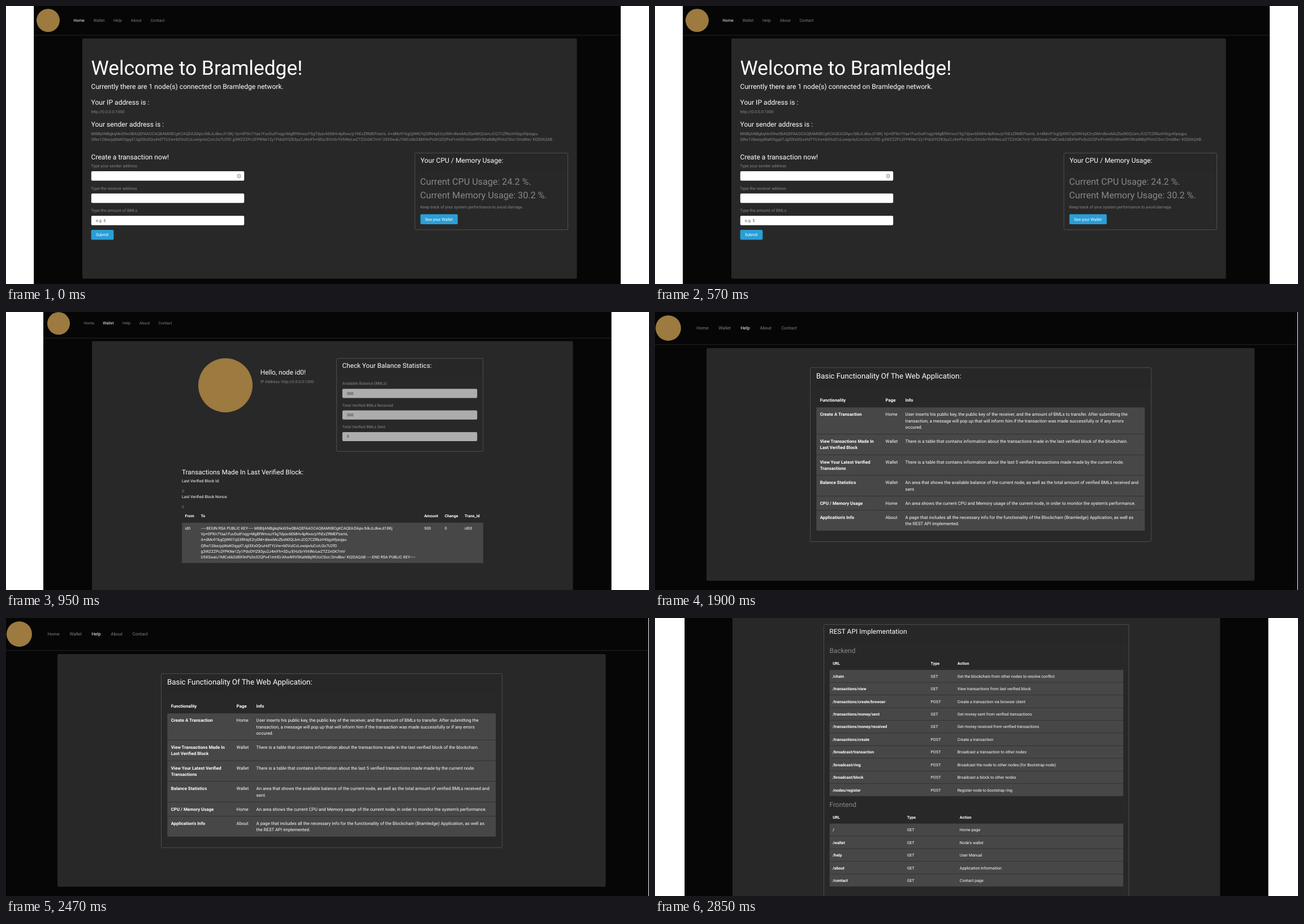
An HTML page for the animation above (3.8 s loop, 1137 by 493 pixels).

```html
<!DOCTYPE html>
<html lang="en">
<head>
<meta charset="utf-8">
<title>Bramledge web client</title>
<style>
  html, body { margin: 0; width: 100%; height: 100%; overflow: hidden; background: #fff; }
  svg { display: block; width: 1137px; height: 493px; }
  text { font-family: Roboto, sans-serif; text-rendering: geometricPrecision; white-space: pre; }
  .page { visibility: hidden; animation: show 3800ms step-end infinite; }
  @keyframes show {
    0% { visibility: visible; }
    25%, 100% { visibility: hidden; }
  }
</style>
</head>
<body>
<svg id="stage" viewBox="0 0 1137 493"></svg>
<script>
const stage = document.getElementById('stage');
const WHITE = '#fff', GREY = '#888', PANEL = '#282828', ROW = '#474747', BLUE = '#2a9fd6', GOLD = '#9c7a40';
const PAGES = ['Home', 'Wallet', 'Help', 'About', 'Contact'];
const KEY = [
  'MIIBIjANBgkqhkiG9w0BAQEFAAOCAQ8AMIIBCgKCAQEA2lApv/blkJLdkwJI18Kj',
  'Vp+0PXn7Yaa1FuvDutFnqg+MgBfWmouY5gTdyav6EMHv4pRxw/pYhExZRMEPzemL',
  'A+dMo91kgQjWKl7q53RHqX2ry0M+dlewMoZbxN0QLbmJCQ7CZRkzrH0qyAfpsqpu',
  'QRw12ikecjqWaKOqypl7Jgl3Xx0QruHdTYLVw+b0VuICcLowipvIuCcrLGs7U2fD',
  'g3WZZZPc2FPKNe1Zy1PdoDYIZ83yu2J4mFh+SDu/EHzSvYlrhlNvLwZTZ2nGK7mV',
  'U5XSwaIJ1MCx6b2d8X9nPs5n32QPx41mHD/AhwN9V5KatMbj9fUrzC0or/2md8w/ KQIDAQAB'
];

let page, body, head;

function add(tag, attrs, parent = page) {
  const el = document.createElementNS('http://www.w3.org/2000/svg', tag);
  for (const name in attrs) el.setAttribute(name, attrs[name]);
  return parent.appendChild(el);
}

function startPage(index, left, right, bodySize, headSize) {
  page = add('g', { class: 'page', style: `animation-delay:${950 * index - 3800}ms` }, stage);
  body = bodySize;
  head = headSize;
  rect(left, 0, right, 493, '#060606');
}

function rect(x1, y1, x2, y2, fill, rx = 0) {
  return add('rect', { x: x1, y: y1, width: x2 - x1, height: y2 - y1, fill, rx });
}

// y is roughly the middle of the capital letters
function text(x, y, str, fill = WHITE, size = body, weight = 400) {
  add('text', { x, y: y + 0.33 * size, fill, 'font-size': size, 'font-weight': weight }).textContent = str;
}
const title = (x, y, str, fill) => text(x, y, str, fill, head);
const bold = (x, y, str) => text(x, y, str, WHITE, body, 700);
const coin = (cx, cy, r) => add('circle', { cx, cy, r, fill: GOLD });

function nav(left, right, lineY, y, xs, active) {
  rect(left, lineY - 0.4, right, lineY + 0.3, '#303030');
  PAGES.forEach((name, i) => text(xs[i], y, name, name === active ? WHITE : '#828282'));
}

function card(x1, y1, x2, y2, headerH) {
  rect(x1, y1, x2, y1 + headerH, 'rgba(0,0,0,.03)');
  rect(x1, y1 + headerH, x2, y1 + headerH + 0.5, 'rgba(0,0,0,.12)');
  const box = rect(x1, y1, x2, y2, 'none', 2);
  box.setAttribute('stroke', '#5a5a5a');
  box.setAttribute('stroke-width', 0.8);
}

function button(x1, y1, x2, label) {
  rect(x1, y1, x2, y1 + 17.6, BLUE, 2);
  text(x1 + 8.3, y1 + 8.9, label);
}

function home() {
  startPage(0, 49.2, 1087, 7.17, 12.13);
  nav(49.2, 1087, 52, 25.2, [119.5, 154.5, 190, 220.8, 255.4], 'Home');
  coin(74.5, 25.5, 20.5);
  rect(135, 57.5, 1009.5, 483.5, PANEL, 2);
  const x = 150.5;
  text(x, 110.5, 'Welcome to Bramledge!', WHITE, 35.35);
  title(x, 142.5, 'Currently there are 1 node(s) connected on Bramledge network.');
  title(x, 171, 'Your IP address is :');
  text(x, 187.4, 'http://0.0.0.0:1000', GREY);
  title(x, 210, 'Your sender address is :');
  text(x, 226.6, KEY.slice(0, 3).join(' '), GREY);
  text(x, 236.7, KEY.slice(3).join(' ') + ' .', GREY);

  title(x, 267.8, 'Create a transaction now!');
  ['Type your sender address', 'Type the receiver address', 'Type the amount of BMLs'].forEach((label, i) => {
    const y = 283.9 + 39.5 * i;
    text(x, y, label, GREY);
    rect(150.8, y + 9.2, 421.2, y + 25.8, WHITE, 2);
  });
  add('rect', { x: 409.6, y: 298.6, width: 5, height: 6, rx: 1, fill: 'none', stroke: '#777', 'stroke-width': 0.9 });
  rect(411.6, 300.2, 412.6, 303, '#777');
  text(159, 381, 'e.g. 5', '#555');
  button(150.6, 397, 190.4, 'Submit');

  card(723, 260.8, 993.5, 396.8, 30.5);
  title(732.9, 273.8, 'Your CPU / Memory Usage:');
  text(732.3, 311.2, 'Current CPU Usage: 24.2 %.', GREY, 16.1);
  text(732.3, 336, 'Current Memory Usage: 30.2 %.', GREY, 16.1);
  text(732.7, 356.8, 'Keep track of your system performance to avoid damage.', GREY);
  button(732.8, 369.3, 798.8, 'See your Wallet');
}

function wallet() {
  startPage(1, 66, 1070.6, 6.94, 11.72);
  nav(66, 1070.6, 46.3, 20.2, [137.3, 171.3, 206, 235.8, 269.5], 'Wallet');
  coin(93, 20.3, 20);
  rect(152, 51.7, 1002.5, 500, PANEL, 2);
  coin(388, 130, 48);
  title(449.8, 107, 'Hello, node id0!');
  text(450, 123.3, 'IP Address: http://0.0.0.0:1000', GREY);

  card(584.6, 82.3, 843.6, 247.2, 29.8);
  title(594.6, 95.3, 'Check Your Balance Statistics:');
  [['Available Balance (BMLs)', 500], ['Total Verified BMLs Received', 500], ['Total Verified BMLs Sent', 0]].forEach(([label, n], i) => {
    const y = 127.1 + 38.3 * i;
    text(594.8, y, label, GREY);
    rect(594.8, y + 9.2, 833.2, y + 25.3, '#adadad', 2);
    text(602.8, y + 17.4, n, '#333');
  });

  const x = 311;
  title(x, 284.1, 'Transactions Made In Last Verified Block:');
  text(x, 299.7, 'Last Verified Block Id:');
  text(x, 317.5, '0', GREY);
  text(x, 327.7, 'Last Verified Block Nonce:');
  text(x, 345.5, '0', GREY);

  const cols = [316.6, 344.6, 739.6, 775.7, 811];
  ['From', 'To', 'Amount', 'Change', 'Trans_Id'].forEach((name, i) => bold(cols[i], 362.1, name));
  rect(311, 373.6, 843.8, 445.2, ROW);
  ['id0', '', '500', '0', 'id00'].forEach((value, i) => text(cols[i], 384, value));
  KEY.forEach((part, i) => {
    const line = (i === 0 ? '-----BEGIN RSA PUBLIC KEY----- ' : '') + part + (i === 5 ? ' -----END RSA PUBLIC KEY-----' : '');
    text(cols[1], 384 + 10.1 * i, line);
  });
}

function help() {
  startPage(2, 0, 1136, 7.85, 13.3);
  nav(0, 1136, 57.8, 28.4, [73.5, 112.4, 151.5, 185.3, 223.5], 'Help');
  coin(23.5, 28.5, 22.5);
  rect(91, 64, 1060.3, 476.5, PANEL, 2.5);
  card(274.5, 98.7, 877.3, 407.3, 33.8);
  title(285, 113.7, 'Basic Functionality Of The Web Application:');
  const cols = [291.7, 407.6, 442.6];
  ['Functionality', 'Page', 'Info'].forEach((name, i) => bold(cols[i], 156.7, name));
  const rows = [
    [47.7, ['Create A Transaction'], 'Home', [
      'User inserts his public key, the public key of the receiver, and the amount of BMLs to transfer. After submitting the',
      'transaction, a message will pop up that will inform him if the transaction was made successfully or if any errors',
      'occured.']],
    [36.6, ['View Transactions Made In', 'Last Verified Block'], 'Wallet', [
      'There is a table that contains information about the transactions made in the last verified block of the blockchain.']],
    [36.6, ['View Your Latest Verified', 'Transactions'], 'Wallet', [
      'There is a table that contains information about the last 5 verified transactions made made by the current node.']],
    [36.6, ['Balance Statistics'], 'Wallet', [
      'An area that shows the available balance of the current node, as well as the total amount of verified BMLs received and',
      'sent.']],
    [25.1, ['CPU / Memory Usage'], 'Home', [
      "An area shows the current CPU and Memory usage of the current node, in order to monitor the system's performance."]],
    [36.6, ["Application's Info"], 'About', [
      'A page that includes all the necessary info for the functionality of the Blockchain (Bramledge) Application, as well as',
      'the REST API implemented.']]
  ];
  let y = 169.2;
  for (const [h, name, where, info] of rows) {
    rect(285.3, y, 866, y + h - 0.7, ROW);
    name.forEach((line, i) => bold(cols[0], y + 12.5 + 11.5 * i, line));
    text(cols[1], y + 12.5, where);
    info.forEach((line, i) => text(cols[2], y + 12.5 + 11.5 * i, line));
    y += h;
  }
}

function routes(y, name, cols, rows) {
  title(308.4, y, name, GREY);
  ['URL', 'Type', 'Action'].forEach((label, i) => bold(cols[i], y + 22.5, label));
  rows.forEach(([url, type, action], i) => {
    const top = y + 33.6 + 22.44 * i;
    rect(308.7, top, 828, top + 21.8, ROW);
    bold(cols[0], top + 11.3, url);
    text(cols[1], top + 11.3, type);
    text(cols[2], top + 11.3, action);
  });
}

function about() {
  startPage(3, 52.3, 1084.5, 7.08, 12.04);
  rect(137, 0, 999.3, 493, PANEL);
  card(298.6, 11.6, 837.8, 500, 30.6);
  title(308.3, 24.5, 'REST API Implementation');
  routes(58.5, 'Backend', [314.2, 487.6, 534.7], [
    ['/chain', 'GET', 'Get the blockchain from other nodes to resolve conflict'],
    ['/transactions/view', 'GET', 'View transactions from last verified block'],
    ['/transactions/create/browser', 'POST', 'Create a transaction via browser client'],
    ['/transactions/money/sent', 'GET', 'Get money sent from verified transactions'],
    ['/transactions/money/received', 'GET', 'Get money received from verified transactions'],
    ['/transactions/create', 'POST', 'Create a transaction'],
    ['/broadcast/transaction', 'POST', 'Broadcast a transaction to other nodes'],
    ['/broadcast/ring', 'POST', 'Broadcast the node to other nodes (for Bootstrap node)'],
    ['/broadcast/block', 'POST', 'Broadcast a block to other nodes'],
    ['/nodes/register', 'POST', 'Register node to bootstrap ring']
  ]);
  routes(331, 'Frontend', [314.2, 445.7, 538.8], [
    ['/', 'GET', 'Home page'],
    ['/wallet', 'GET', "Node's wallet"],
    ['/help', 'GET', 'User Manual'],
    ['/about', 'GET', 'Application Information'],
    ['/contact', 'GET', 'Contact page']
  ]);
}

home();
wallet();
help();
about();
</script>
</body>
</html>
```
